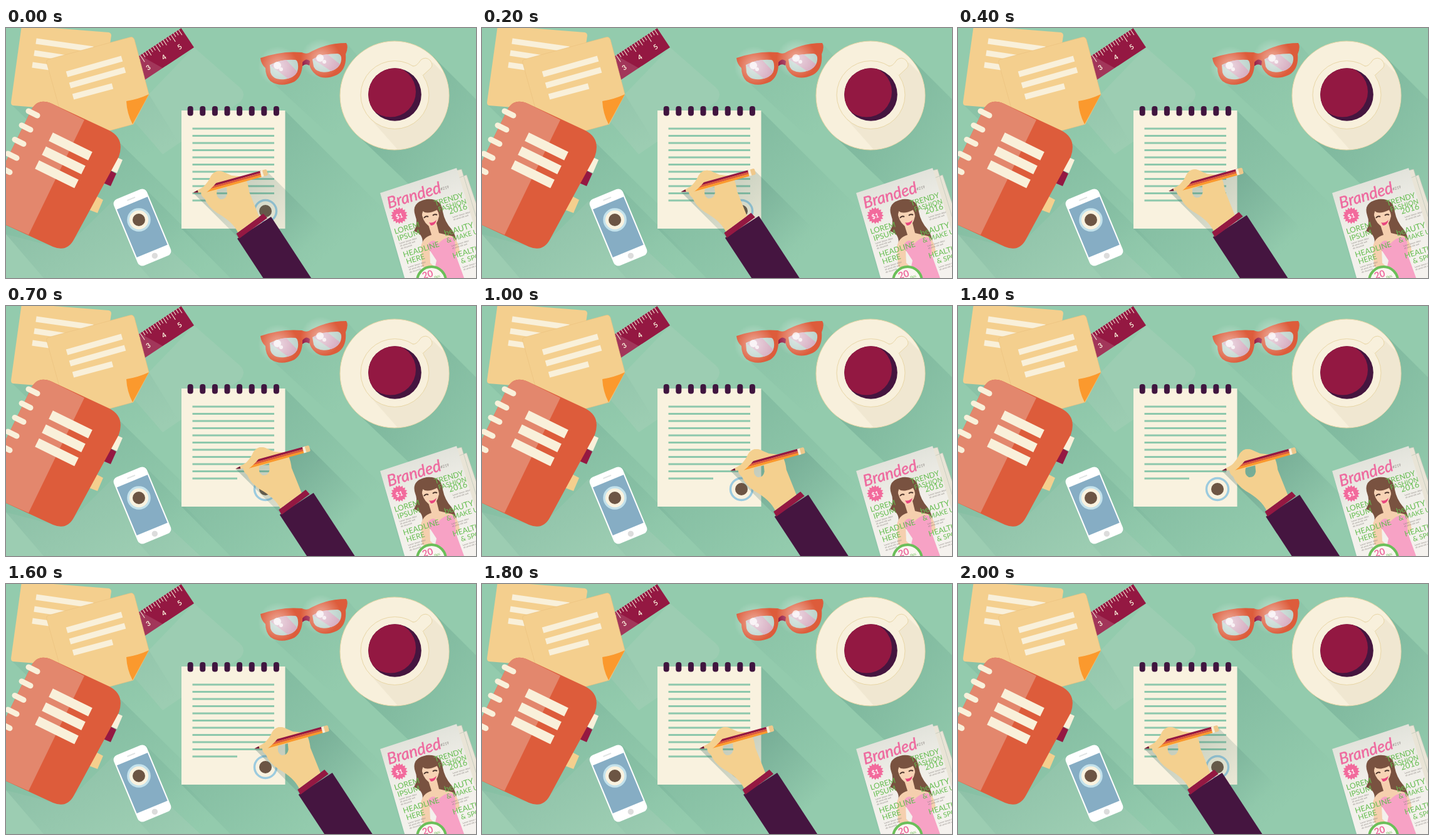
These frames come from a looping animation (750x400 px, 2100 ms). An HTML page:

```html
<!DOCTYPE html>
<html lang="en">
<head>
<meta charset="utf-8">
<title>Desk</title>
<style>
  html, body { margin: 0; width: 100%; height: 100%; overflow: hidden; background: #93cbad; }
  svg { display: block; width: 750px; height: 400px; }
  text { font-family: Lato, "Open Sans", sans-serif; }
</style>
</head>
<body>
<svg viewBox="0 0 750 400">
  <defs>
    <linearGradient id="shade" x1="0" y1="0" x2="1" y2="1">
      <stop offset=".25" stop-color="#55917f" stop-opacity=".32"/>
      <stop offset=".8" stop-color="#55917f" stop-opacity="0"/>
    </linearGradient>
    <linearGradient id="handShade" gradientUnits="userSpaceOnUse" x1="350" y1="240" x2="470" y2="360">
      <stop offset="0" stop-color="#3f7068" stop-opacity=".3"/>
      <stop offset="1" stop-color="#3f7068" stop-opacity="0"/>
    </linearGradient>
    <linearGradient id="paper" x1="0" y1="0" x2=".3" y2="1">
      <stop offset="0" stop-color="#d9dcd3"/><stop offset=".5" stop-color="#f0eee8"/><stop offset="1" stop-color="#f5f2ee"/>
    </linearGradient>
    <radialGradient id="glow">
      <stop offset="0" stop-color="#fff" stop-opacity=".5"/><stop offset="1" stop-color="#fff" stop-opacity="0"/>
    </radialGradient>
    <clipPath id="coffee"><circle cx="620.500" cy="106.500" r="42.300"/></clipPath>
    <clipPath id="saucer"><circle cx="620" cy="108" r="87"/></clipPath>
  </defs>

  <rect width="750" height="400" fill="#93cbad"/>
  <g fill="#cfd8cc" opacity=".16">
    <path d="M300 31L374 96Q384 106 374 118L250 202L205 150L228 106Z"/>
    <path d="M0 330L92 354L170 277L265 358L310 400H0Z"/>
  </g>
  <g fill="url(#shade)">
    <path d="M8 122L120 230L280 190L228 106Z" opacity=".45"/>
    <path d="M183 185L325 325L250 400H60L0 330V300Z" opacity=".75"/>
    <path d="M222 257L365 400H230L213 381Z" opacity=".45"/>
    <path d="M445 132L600 287L490 400H358L280 321Z" opacity=".85"/>
    <path d="M545 26L600 90L550 165Q530 180 508 164L424 86Z" opacity=".35"/>
    <path d="M682 46L800 164V400L559 170Z"/>
  </g>

  <g id="ruler"></g>
  <g id="notes">
    <path d="M25 -4L164 7Q168 8 168 12L150 135L11 124Q8 123 8 119Z" fill="#f4cf8e"/>
    <path d="M48 21L139 34M45 40L110 50M42 59L90 66" stroke="#f9f0da" stroke-width="9"/>
    <path d="M68 50L197 15Q203 13 205 19L228 106L203 154L100 182L65 56Q64 51 68 50Z" fill="#f4cf8e" stroke="#e9bf7c" stroke-width=".6"/>
    <path d="M192 117Q211 114 228 106L202 154Q193 137 192 117Z" fill="#fb992d"/>
    <path d="M97 74L185 49M102 92L190 67M107 110L170 93" stroke="#f9f0da" stroke-width="9.500"/>
  </g>

  <g id="notebook">
    <path d="M173 205L186 211L177 232L163 226Z" fill="#f9f0da"/>
    <path d="M163 226L176 233L167 253L153 247Z" fill="#941842"/>
    <path d="M142 268L155 275L146 296L130 290Z" fill="#f4cf8e"/>
    <path d="M-20 254L40 132Q50 111 73 121L165 164Q190 177 180 206L108 339Q97 359 75 350L-20 306Z" fill="#dd5c3b"/>
    <path d="M-20 254L40 132Q50 111 73 121L125 147L36 331L-20 306Z" fill="#e3876d"/>
    <g id="binding" stroke="#f9f0da"></g>
  </g>

  <g transform="translate(217.5 319) rotate(-22.5)">
    <rect x="-28.500" y="-57.500" width="57" height="115" rx="8" fill="#fff"/>
    <rect x="-26.500" y="-42" width="53" height="83" fill="#86adc4"/>
    <path d="M-5 -49H7" stroke="#dfe3e3" stroke-width="2" stroke-linecap="round"/>
    <circle cx="1" cy="49.500" r="4.700" fill="#dcdcdc"/>
  </g>
  <g id="badge" transform="translate(212 307)" color="#c3e2ec">
    <circle r="17" fill="#f9f2df" stroke="currentColor" stroke-width="3.500"/>
    <circle r="10" fill="#6c5544"/>
  </g>

  <rect x="280" y="132" width="165.500" height="189" fill="#f9f2df"/>
  <g id="pad"></g>
  <g transform="translate(414 293)">
    <circle r="17.500" fill="#f9f2df" stroke="#9ccbdf" stroke-width="3.500"/>
    <circle r="10" fill="#6c5544"/>
  </g>

  <g id="glasses">
    <path d="M406 48Q440 36 472 39Q478 42 483 40Q510 24 543 24Q547 30 542 42Q544 66 528 75Q508 84 495 75Q486 68 484 58Q478 55 473 60Q472 78 460 86Q438 96 422 85Q414 77 414 64Q407 58 406 48Z" fill="#dd5c3b"/>
    <path d="M473 55Q479 47 485 53L484 60Q478 56 473 61Z" fill="#941842"/>
    <path d="M421 59Q440 49 462 51Q467 53 466 65Q464 79 445 82Q426 84 422 71ZM489 50Q505 41 529 41Q536 42 535 51Q534 65 515 70Q496 73 491 62Z" fill="#bdd3cc"/>
    <path d="M422 60Q434 52 447 51L465 70Q460 78 450 81ZM490 50Q500 43 513 42L533 58Q528 66 519 69Z" fill="#d6acc0"/>
    <circle cx="434" cy="61" r="32" fill="url(#glow)"/><circle cx="502" cy="49" r="32" fill="url(#glow)"/>
    <g fill="#fff" opacity=".75"><circle cx="433" cy="60" r="6"/><circle cx="501" cy="48" r="6"/><circle cx="439" cy="66" r="3"/><circle cx="508" cy="54" r="3"/></g>
  </g>

  <g stroke="#e8d6a6" stroke-width="1">
    <circle cx="620" cy="108" r="87" fill="#f8f0dc"/>
    <path d="M681 55L760 134L660 234L582 146Z" fill="#e9dfc8" opacity=".5" stroke="none" clip-path="url(#saucer)"/>
    <circle cx="620.500" cy="107" r="54.500" fill="#f8f0dc"/>
    <path d="M649 61Q655 62 662 51Q670 45 677 52Q683 60 677 65L665 76" fill="#f8f0dc"/>
    <path d="M650 63L666 77L655 90L637 75Z" fill="#f8f0dc" stroke="none"/>
  </g>
  <circle cx="620.500" cy="106.500" r="42.300" fill="#45153f"/>
  <circle cx="613.500" cy="102" r="40.500" fill="#931842" clip-path="url(#coffee)"/>

  <g id="magazine">
    <path d="M597 264L660 330L690 400H634Z" fill="url(#shade)" opacity=".6"/>
    <path d="M718 228L727 226L780 400H755ZM722 240L735 235L790 400H760Z" fill="#e9e4d6" stroke="#b9c4b6" stroke-width=".7"/>
    <path d="M597 264L719 224L775 410H639Z" fill="url(#paper)"/>
    <path d="M651 325Q658 312 653 300Q646 279 671 274Q695 272 697 294Q700 310 711 322Q724 340 716 364L700 372L664 348Q668 330 651 325Z" fill="#795240"/>
    <path d="M674 315L687 312L691 328L712 333Q722 340 724 358L716 366L698 350L676 354L677 376L694 391L687 400L664 381L662 350Q665 335 679 331Z" fill="#f5cfae"/>
    <path d="M672 349Q679 334 690 345Q704 330 716 337L718 364L731 400H681L687 372Z" fill="#f7a2c5"/>
    <path d="M664 300Q664 286 677 284Q690 287 691 301Q688 316 679 319Q668 315 664 300Z" fill="#f7d3b5"/>
    <path d="M656 308Q655 281 672 277Q694 277 695 305Q691 297 688 291Q672 299 665 293Q664 300 656 308Z" fill="#795240"/>
    <path d="M667 304Q670 300 674 302M681 300Q684 297 688 299" fill="none" stroke="#49322a" stroke-width="2"/>
    <path d="M675 311Q681 313 687 307Q685 316 678 316Z" fill="#e9467e"/>
    <path id="burst" fill="#f26a9c"/>
    <circle cx="679" cy="405" r="23" fill="#faf7f1" stroke="#6bbf59" stroke-width="4"/>
    <g id="cover"></g>
  </g>

  <g id="writer">
    <path d="M299 264L417 230L587 400H435Z" fill="url(#handShade)"/>
    <path d="M423 302L500 420H423.500L369 337Z" fill="#451540"/>
    <path d="M367.500 329L410.500 297L417 304L372 337Z" fill="#941842"/>
    <path fill-rule="evenodd" d="M312 260Q323 247 327 237Q334 226 346 230L360 236L380 238Q386 245 388 262L404 302L370 327Q362 310 337 296Q322 286 317 273Q309 267 312 260ZM337 259Q334 270 342 274Q351 275 353 265L352 255Z" fill="#f4d08f"/>
    <g transform="translate(298.500 263.500) rotate(-15.500)">
      <path d="M0 0L20 -5V5Z" fill="#f3cf93"/><path d="M0 0L8 -2V2Z" fill="#6d1638"/>
      <path d="M20 -5H114V-1.500H20Z" fill="#941842"/>
      <path d="M20 -1.700H114V1.700H20Z" fill="#dd5c3b"/>
      <path d="M20 1.500H114V5H20Z" fill="#fb992d"/>
      <path d="M112 -5H117V5H112Z" fill="#f8efd9"/><path d="M116 -5H121Q123 -5 123 -3V3Q123 5 121 5H116Z" fill="#efc88b"/>
    </g>
    <path d="M311 258Q323 247 327 237Q334 226 346 230L358 236Q343 240 336 247Q330 255 320 263Q311 265 311 258Z" fill="#f4d08f"/>
  </g>
</svg>

<script>
const byId = id => document.getElementById(id);
const add = (id, markup) => byId(id).insertAdjacentHTML('beforeend', markup);
const times = (n, fn) => Array.from({ length: n }, (_, i) => fn(i)).join('');

// Ruler, laid out along its own axis
byId('ruler').setAttribute('transform', 'translate(300 31) rotate(-33.500)');
add('ruler', '<path d="M0 0H-96V-37H0Z" fill="#941842"/>' +
  '<path d="M-60 0H-96V-37H-79Z" fill="#fff" opacity=".13"/>' +
  times(18, i => `<path d="M${-5 - i * 4.9} -37v${i % 6 === 3 ? 13 : i % 3 === 0 ? 10 : 7}" stroke="#f9f0da"/>`) +
  times(3, i => `<text x="${-22 - i * 30}" y="-9.500" font-size="11" font-weight="700" fill="#f9f0da">${5 - i}</text>`));

add('binding', times(3, i => {
  const x = 71.5 - i * 11, y = 174 + i * 22.3;
  return `<path d="M${x} ${y}l63 31" stroke-width="15"/>`;
}) + times(5, i => `<path d="M${36 - i * 11} ${133 + i * 22.7}l14 7" stroke-width="9" stroke-linecap="round"/>`));

add('pad', times(11, i =>
  `<path d="M297.500 ${161 + i * 11.5}H${i === 10 ? 369 : 428}" stroke="#8dc8ac" stroke-width="3"/>`) +
  times(8, i => `<rect x="${289.7 + i * 19.6}" y="125" width="9" height="15.500" rx="4" fill="#40153f"/>`));

byId('burst').setAttribute('d', 'M' + Array.from({ length: 32 }, (_, i) => {
  const a = i * Math.PI / 16, r = i % 2 ? 10.5 : 13.5;
  return `${627.5 + r * Math.cos(a)} ${300 + r * Math.sin(a)}`;
}).join('L') + 'Z');

const GREEN = '#64bd4f', PINK = '#ee6a9f', GREY = '#8b8580';
const label = (x, y, size, color, words, extra = '') =>
  `<text transform="translate(${x} ${y}) rotate(-17)" font-size="${size}" fill="${color}" ${extra}>${words}</text>`;
const blurb = (x, y, rows) => times(rows, i =>
  label(x + i * 1.2, y + i * 4, 3.6, GREY, ['Lorem ipsum dolor', 'sit amet elit sed', 'do eiusmod'][i]));

add('cover',
  label(611, 289, 25.5, PINK, 'Branded', 'font-style="italic" stroke="#ee6a9f" stroke-width=".5"') +
  label(694, 260, 6, GREY, '#219') +
  label(623, 306, 10, '#fff', '$1', 'font-weight="700"') +
  label(685, 285, 12.2, GREEN, 'TRENDY') +
  label(691, 294, 10.8, GREEN, 'FASHION') +
  label(708, 298, 13, GREEN, '2016') +
  label(621, 330, 12.2, GREEN, 'LOREM') +
  label(626, 341, 12, GREEN, 'IPSUM') +
  label(635, 367, 12.2, GREEN, 'HEADLINE') +
  label(640, 378, 12, GREEN, 'HERE') +
  label(701, 333, 13, GREEN, 'beAUTY') +
  label(704, 344, 11, GREEN, '&amp; MAKE UP') +
  label(714, 369, 12.2, GREEN, 'HEALTH') +
  label(727, 377, 11, GREEN, '&amp; SPORT') +
  label(666, 402, 15, PINK, '20', 'font-weight="700"') +
  label(684, 401, 6, GREEN, 'tips') +
  blurb(628, 346, 3) + blurb(642, 384, 3) + blurb(713, 304, 2) + blurb(711, 350, 2) + blurb(729, 384, 2));

const LOOP = 2100, STEP = 100;
const slide = [[0, 0], [400, 37.7], [1000, 97.7], [1400, 122.2], [1500, 122.2], [1600, 97.7], [2000, -1.5]];
const lift = [[0, 0], [400, -2.6], [700, -3], [1000, 0], [2000, 0]];

function at(keys, t) {
  const i = Math.max(1, keys.findIndex(k => k[0] >= t));
  const [t0, a] = keys[i - 1], [t1, b] = keys[i];
  return a + (b - a) * (t - t0) / (t1 - t0);
}

function draw(now) {
  const t = Math.floor(now % LOOP / STEP) * STEP;
  byId('writer').setAttribute('transform', `translate(${at(slide, t)} ${at(lift, t)})`);
}

function tick() {
  draw(performance.now());
  requestAnimationFrame(tick);
}
tick();
</script>
</body>
</html>
```
